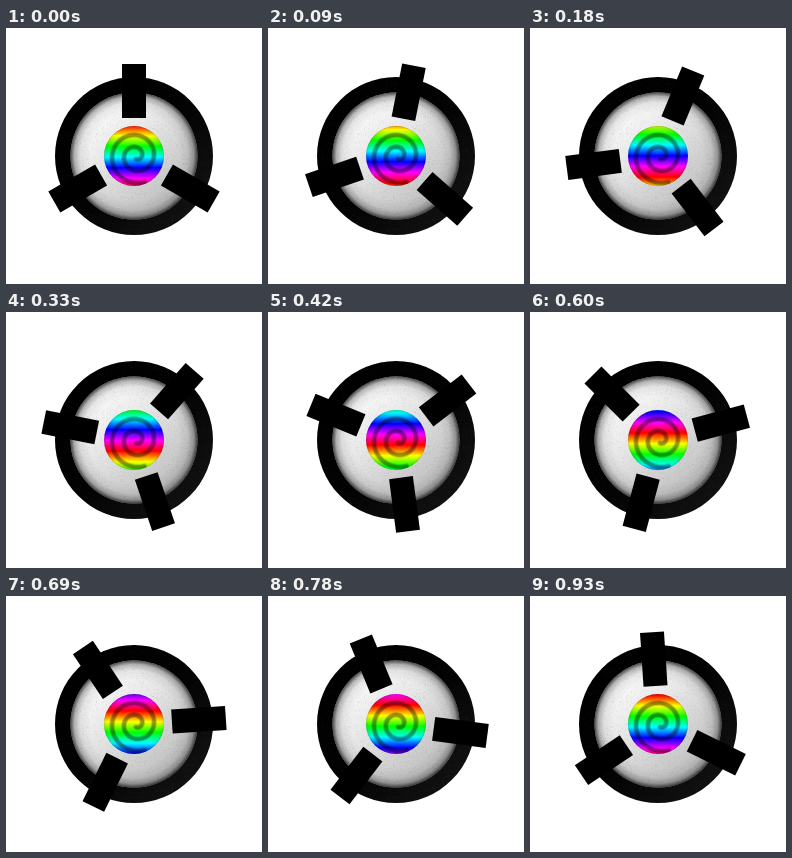
These frames come from a looping animation (256x256 px, 0.96 s). An HTML page with a canvas:

```html
<!DOCTYPE html>
<html lang="en">
<head>
<meta charset="utf-8">
<title>Spinning wheel</title>
<style>
  html, body { margin: 0; width: 100%; height: 100%; overflow: hidden; background: #fff; }
  canvas { display: block; width: 256px; height: 256px; }
</style>
</head>
<body>
<canvas id="stage" width="256" height="256"></canvas>
<script>
const STEP = 30, STEPS = 32;
const C = 128, RIM = 79, FACE = 63.5, BALL = 30;
const BAND_TOP = 97, BAND_PERIOD = 64;
const RAINBOW = ['#f00', '#ff0', '#0f0', '#0ff', '#00f', '#f0f', '#f00'];
const ctx = document.getElementById('stage').getContext('2d');

function disc(g, r, fill) {
  g.fillStyle = fill;
  g.beginPath();
  g.arc(C, C, r, 0, Math.PI * 2);
  g.fill();
}

function withStops(gradient, stops) {
  for (const [at, color] of stops) gradient.addColorStop(at, color);
  return gradient;
}

function layer(draw) {
  const canvas = document.createElement('canvas');
  canvas.width = canvas.height = 256;
  draw(canvas.getContext('2d'));
  return canvas;
}

function seeded(seed) {
  return () => (seed = (seed * 16807) % 2147483647) / 2147483647;
}

const body = layer(g => {
  disc(g, RIM, withStops(g.createLinearGradient(75, 75, 186, 186),
    [[0, '#000'], [0.5, '#030303'], [1, '#111']]));
  disc(g, FACE, withStops(g.createLinearGradient(84, 76, 174, 182),
    [[0, '#fff'], [0.4, '#e6e6e6'], [1, '#b8b8b8']]));
  // Soft shadow where the face meets the rim
  disc(g, FACE, withStops(g.createRadialGradient(C, C, 44, C, C, FACE),
    [[0, 'rgba(0,0,0,0)'], [0.5, 'rgba(0,0,0,.07)'], [0.8, 'rgba(0,0,0,.28)'], [1, 'rgba(0,0,0,.7)']]));

  // Fine grain
  const rnd = seeded(41);
  for (let i = 0; i < 5000; i++) {
    const a = rnd() * Math.PI * 2, r = Math.sqrt(rnd()) * (RIM - 2);
    const shade = rnd() < 0.5 ? 0 : 255;
    g.fillStyle = `rgba(${shade},${shade},${shade},${r < FACE ? 0.04 : 0.02})`;
    g.fillRect(Math.floor(C + r * Math.cos(a)), Math.floor(C + r * Math.sin(a)), 1, 1);
  }
});

const swirl = layer(g => {
  disc(g, BALL, withStops(g.createRadialGradient(C, C, 26, C, C, BALL),
    [[0, 'rgba(0,0,0,0)'], [0.7, 'rgba(0,0,0,.05)'], [1, 'rgba(0,0,0,.2)']]));
  g.clip();
  g.beginPath();
  for (let i = 0; i <= 100; i++) {
    const k = i / 100, a = Math.PI * (0.4 + 4.1 * k), r = 27.5 - 24.5 * k;
    g.lineTo(130 + r * Math.cos(a), C + r * Math.sin(a));
  }
  g.lineCap = g.lineJoin = 'round';
  for (const [width, alpha] of [[5.5, 0.18], [3.5, 0.26]]) {
    g.lineWidth = width;
    g.strokeStyle = `rgba(0,0,0,${alpha})`;
    g.stroke();
  }
});

function drawBall(phase) {
  const top = BAND_TOP - phase * BAND_PERIOD;
  const bands = ctx.createLinearGradient(0, top, 0, top + BAND_PERIOD * 2);
  for (let turn = 0; turn < 2; turn++) {
    RAINBOW.forEach((color, i) => bands.addColorStop((turn + i / 6) / 2, color));
  }
  disc(ctx, BALL, bands);
  ctx.drawImage(swirl, 0, 0);
}

function drawBars(phase) {
  ctx.fillStyle = '#000';
  for (let i = 0; i < 3; i++) {
    ctx.save();
    ctx.translate(C, C);
    ctx.rotate((i + phase) * Math.PI * 2 / 3);
    ctx.fillRect(-12, -92, 24, 54);
    ctx.restore();
  }
}

function render(ms) {
  const phase = Math.floor(ms / STEP) % STEPS / STEPS;
  ctx.fillStyle = '#fff';
  ctx.fillRect(0, 0, 256, 256);
  ctx.drawImage(body, 0, 0);
  drawBall(phase);
  drawBars(phase);
}

const start = performance.now();
function tick() {
  render(performance.now() - start);
  requestAnimationFrame(tick);
}
tick();
</script>
</body>
</html>
```
